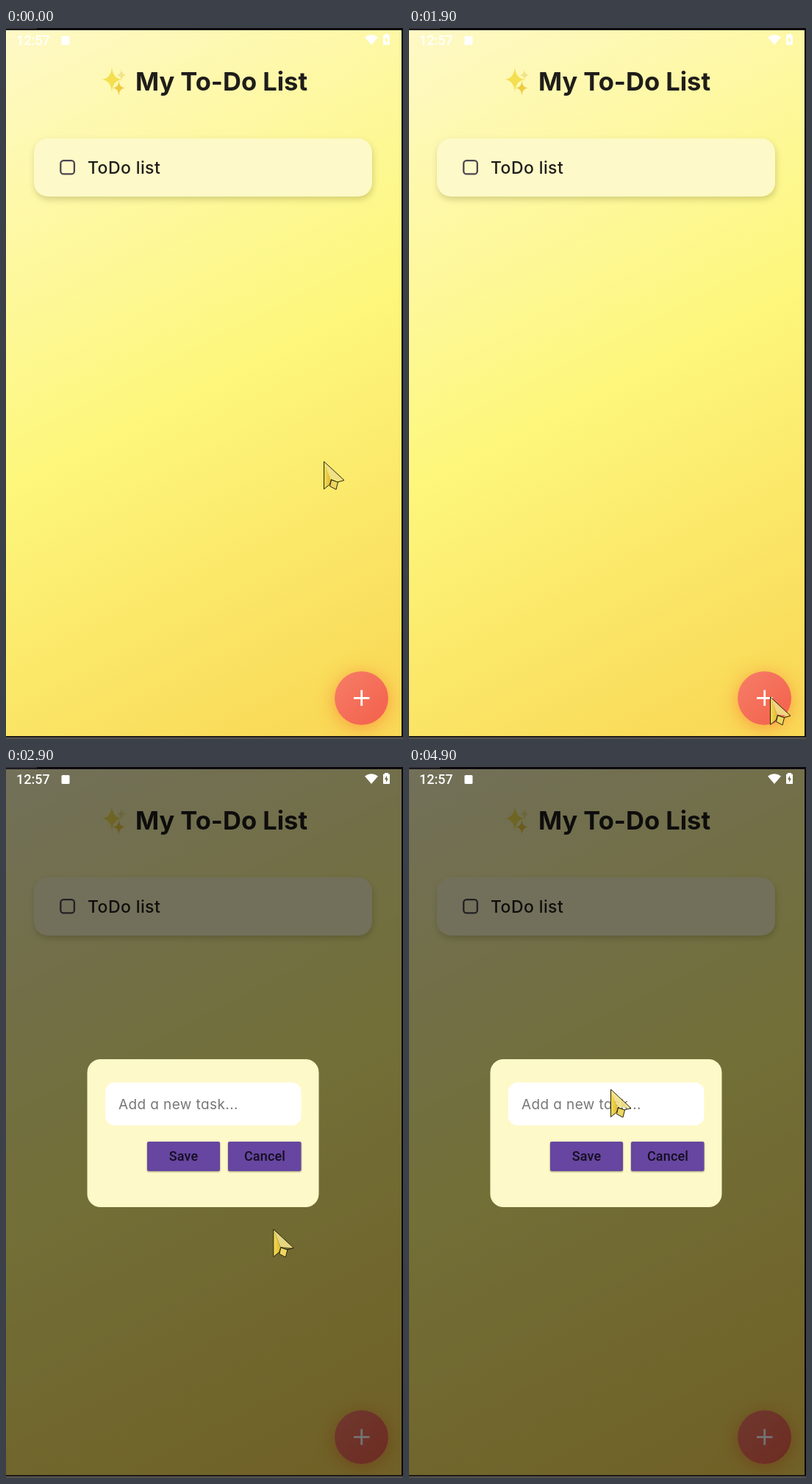
Recreate the animation shown at these times as an HTML page. Size 540 by 966 pixels, loop 5000 ms.

```html
<!DOCTYPE html>
<html lang="en">
<head>
<meta charset="utf-8">
<title>To-do list</title>
<style>
  html, body { margin: 0; width: 100%; height: 100%; overflow: hidden; background: #0c0a0e; }
  #stage { position: relative; width: 540px; height: 966px; overflow: hidden; }
  #app { position: absolute; left: 0; top: 3px; width: 538px; height: 959px;
    background: linear-gradient(153deg, #fef9c6, #fdf77c 50%, #f9d957 94%); }
  svg { position: absolute; left: 0; top: 0; }
  .task { position: absolute; left: 38px; top: 150px; width: 460px; height: 79px;
    border-radius: 19px; background: #fdf9c8; box-shadow: 1px 4px 8px rgba(70, 65, 0, .22); }
  .add { position: absolute; left: 447px; top: 874px; width: 73px; height: 73px; border-radius: 50%;
    background: linear-gradient(135deg, #f67d68, #f3604a); box-shadow: 0 4px 24px rgba(250, 125, 50, .65); }
  #dim { position: absolute; left: 0; top: 3px; width: 538px; height: 959px; background: #000; }
  text { font-family: Inter, "Open Sans", sans-serif; font-feature-settings: "cv11"; fill: #1f1d1a; }
  .ui { font-family: Roboto, sans-serif; font-weight: 500; font-size: 18px; }
  .btn { fill: #6646a0; filter: drop-shadow(0 1px 1px rgba(0, 0, 0, .4)); }
</style>
</head>
<body>
<div id="stage">
  <div id="app"></div>
  <div class="task"></div>
  <div class="add"></div>
  <svg width="540" height="966">
    <defs>
      <path id="star" d="M0-1Q.08-.08 1 0Q.08.08 0 1Q-.08.08-1 0Q-.08-.08 0-1Z"/>
    </defs>
    <use href="#star" transform="translate(144 70) scale(14 17)" fill="#f4df50"/>
    <use href="#star" transform="translate(157 64) scale(6.5 8)" fill="#f1e28c"/>
    <use href="#star" transform="translate(153.5 81.5) scale(8 10)" fill="#efcb42"/>
    <text x="293" y="84.5" font-size="34.5" font-weight="700" text-anchor="middle">My To-Do List</text>
    <rect x="74.3" y="180.2" width="18.6" height="18.2" rx="4" fill="none" stroke="#4c4450" stroke-width="2.3"/>
    <text x="111" y="197.5" font-size="23" font-weight="500" letter-spacing=".4">ToDo list</text>
    <path d="M473 910.3h21.5M483.7 899.5v21.5" stroke="#fff" stroke-width="2.8"/>
  </svg>
  <div id="dim"></div>
  <svg width="540" height="966">
    <defs>
      <linearGradient id="gold"><stop stop-color="#f3dc58"/><stop offset="1" stop-color="#dfb92e"/></linearGradient>
    </defs>
    <path d="M0 0H540V3H0ZM538 0h2v966h-2ZM0 962H540v2H0Z" fill="#0c0a0e"/>
    <path d="M0 0H42V2H0Z" fill="#2b2830"/>
    <path d="M0 963.5H540V966H0Z" fill="#55524d"/>

    <g fill="#fff">
      <text class="ui" x="14" y="23" style="fill:#fff">12:57</text>
      <rect x="75.5" y="11" width="11" height="12" rx="1.5"/>
      <path d="M488 12.6Q497 6 506 12.6L497 23Z"/>
      <path fill-rule="evenodd" d="M515 9.5V8h5v1.5h1.2q.8 0 .8 .8V22.2q0 .8-.8 .8h-7.4q-.8 0-.8-.8V10.3q0-.8 .8-.8ZM518 11.5l-3 5.5h2v4l3-5.5h-2Z"/>
    </g>

    <g id="dialog">
      <rect x="110.5" y="397" width="315" height="201" rx="18" fill="#fef9c8"/>
      <rect x="135" y="428.5" width="266.5" height="58.5" rx="13" fill="#fff"/>
      <text x="153" y="465" font-size="19" letter-spacing=".4" style="fill:#777">Add a new task...</text>
      <rect class="btn" x="192" y="509" width="99" height="40" rx="2"/>
      <rect class="btn" x="302" y="509" width="99.5" height="40" rx="2"/>
      <g text-anchor="middle">
        <text class="ui" x="241.5" y="535" letter-spacing=".15" style="fill:#150e20">Save</text>
        <text class="ui" x="352" y="535" letter-spacing=".15" style="fill:#150e20">Cancel</text>
      </g>
    </g>

    <g id="cursor" stroke="#29240f" stroke-linejoin="round">
      <path d="M.5 0L28 25.5L10 24Z" fill="#f0e088" fill-opacity=".92" stroke="none"/>
      <path d="M.5 0L10 25L8.5 31L.5 37.5Z" fill="url(#gold)" stroke="none"/>
      <path d="M.5 0L28 25.5L18.5 28L10.5 24.5L8.5 31L.5 37.5Z" fill="none"/>
      <path d="M10.5 25L19.5 28L17 38L8.5 33.5Z" fill="#ecd660"/>
    </g>
  </svg>
</div>
<script>
  const LOOP = 5000, STEP = 100;
  const $ = id => document.getElementById(id);

  // Cursor stops: time, x, y
  const stops = [
    [0, 432, 589], [100, 432, 589], [900, 492, 912], [1400, 492, 912], [1700, 491, 909],
    [2400, 491, 909], [3300, 272, 427], [3900, 272, 427], [4500, 274, 438], [LOOP, 274, 438]
  ];
  const ease = k => k * k * (3 - 2 * k);

  function cursorAt(t) {
    const i = stops.findIndex(s => s[0] > t);
    const [t0, x0, y0] = stops[i - 1], [t1, x1, y1] = stops[i];
    const k = ease((t - t0) / (t1 - t0));
    return [x0 + (x1 - x0) * k, y0 + (y1 - y0) * k];
  }

  function draw(now) {
    const t = Math.floor(now % LOOP / STEP) * STEP;
    const open = t >= 2100, opening = t === 2000;
    $("dim").style.opacity = open ? .55 : opening ? .46 : 0;
    $("dialog").style.opacity = open ? 1 : opening ? .73 : 0;
    $("cursor").setAttribute("transform", `translate(${cursorAt(t)})`);
    requestAnimationFrame(draw);
  }
  draw(0);
</script>
</body>
</html>
```
